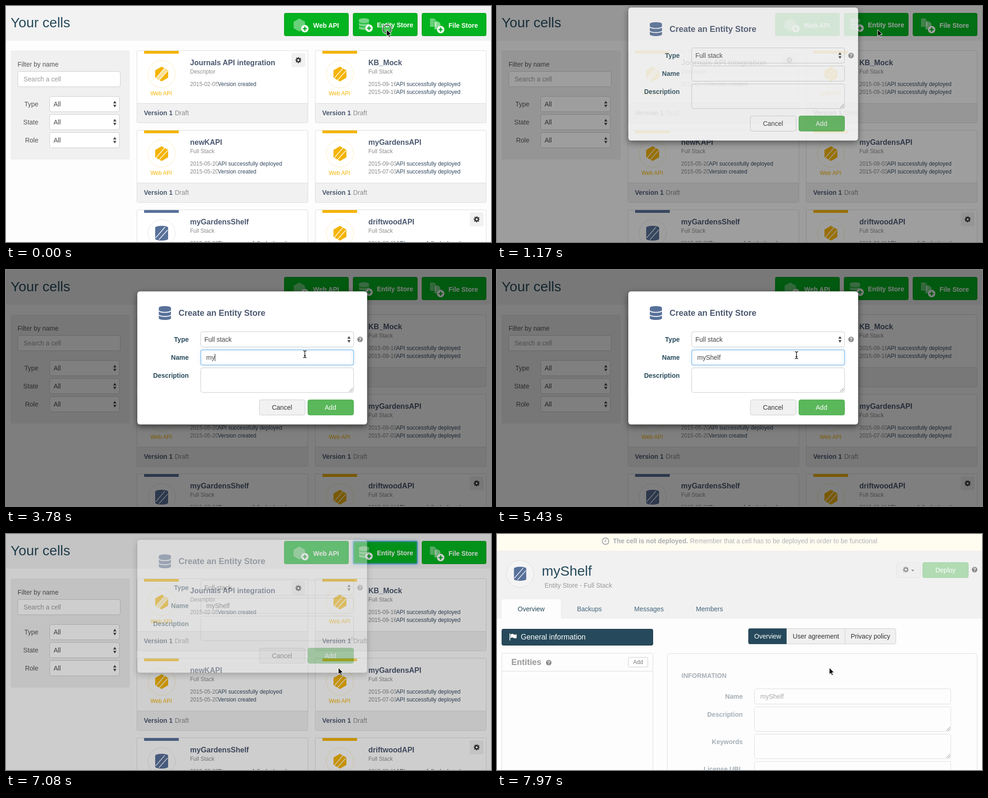
An HTML page that plays this animation: 1050x510 px, repeating every 8 s.

```html
<!DOCTYPE html>
<html lang="en">
<head>
<meta charset="utf-8">
<title>Your cells</title>
<style>
html, body { margin: 0; width: 100%; height: 100%; overflow: hidden; background: #fdfdfd; }
svg { display: block; width: 1050px; height: 510px; font-family: "Liberation Sans", Arial, sans-serif; }
.glow { fill: none; stroke: #66afe9; filter: drop-shadow(0 0 3px rgba(82, 168, 236, .8)); }
#dialog > rect:first-child { filter: drop-shadow(0 5px 7px rgba(0, 0, 0, .5)); }
text { white-space: pre; }
</style>
</head>
<body>
<svg id="stage" viewBox="0 0 1050 510"></svg>
<script>
const NAVY = '#264a5b', SLATE = '#4b5870', GOLD = '#f4b400', BLUE = '#58719a', GREY = '#f1f1f1';
const B = 'font-weight="700"', MID = 'text-anchor="middle"', END = 'text-anchor="end"';
const NAME = 'myShelf';

// Drawing helpers
const text = (x, y, s, fill, size = 14, more = '') =>
  `<text x="${x}" y="${y}" fill="${fill}" font-size="${size}" ${more}>${s}</text>`;
const rect = (x, y, w, h, fill, more = '') =>
  `<rect x="${x}" y="${y}" width="${w}" height="${h}" fill="${fill}" ${more}/>`;
const box = (x, y, w, h, fill = '#fff', stroke = '#ccc', r = 4, more = '') =>
  rect(x + .5, y + .5, w - 1, h - 1, fill, `stroke="${stroke}" rx="${r}" ${more}`);
const path = (d, fill, more = '') => `<path d="${d}" fill="${fill}" ${more}/>`;
const circle = (x, y, r, fill, more = '') => `<circle cx="${x}" cy="${y}" r="${r}" fill="${fill}" ${more}/>`;
const at = (x, y, s, k = 1) => `<g transform="translate(${x} ${y}) scale(${k})">${s}</g>`;

const HEX = 'M0-16L14-8V8L0 16L-14 8V-8Z';
const DRUM = 'M-14-12a14 4 0 0 1 28 0v24a14 4 0 0 1-28 0Z';
const slashes = path('M-13 10L7-13M-6 14L13-7', 'none', 'stroke="#fff" stroke-width="1.4"');
const disks = (fill, gap) => path(DRUM, fill) +
  path('M-14-5.5a14 4 0 0 0 28 0M-14 4a14 4 0 0 0 28 0', 'none', `stroke="${gap}" stroke-width="2"`);
const badge = circle(0, 0, 8, '#fff') + path('M-4.5 0h9M0-4.5v9', 'none', 'stroke="#04ac20" stroke-width="2.6"');
const gear = (x, y, c) => at(x, y,
  circle(0, 0, 3.6, 'none', `stroke="${c}" stroke-width="2.8"`) +
  circle(0, 0, 5.4, 'none', `stroke="${c}" stroke-width="2.4" stroke-dasharray="2.12" stroke-dashoffset="1.06"`));
const help = (x, y, c = '#8a8a8a') => circle(x, y, 6, c) + text(x, y + 3.8, '?', '#fff', 10.5, `${B} ${MID}`);
const arrows = (x, y) => path(`M${x - 3.5} ${y - 1.5}h7l-3.5-5.5ZM${x - 3.5} ${y + 1.5}h7l-3.5 5.5Z`, '#444');
const grip = (x, y) => path(`M${x - 8} ${y}l8-8M${x - 4} ${y}l4-4`, 'none', 'stroke="#777"');

function button(x, label, tx, ty, icon, bx, by) {
  return box(x, 15, 140, 50, '#04b320', '#0a9a20', 3) + icon + at(bx, by, badge) + text(tx, ty, label, '#fff', 14, B);
}

function card(col, row, title, sub, events, kind, hasGear) {
  const store = kind === 'store', tint = store ? BLUE : GOLD;
  let s = box(0, 0, 371, 157, '#fff', '#dcdcdc', 2) + rect(1, 114, 369, 42, GREY) + rect(1, 114, 369, 1, '#dcdcdc') +
    rect(16, 1, 75, 6, tint) + circle(54, 51, 29.5, '#fff', `stroke="${store ? '#e6e6ea' : '#fbecc0'}"`) +
    at(54, 51, path(store ? DRUM : HEX, tint) +
      (kind === 'part' ? path('M-13 9L6-13L13-8L-5 14Z', '#fbdf94') : '') + slashes) +
    text(53, 97, store ? 'Entity Store' : 'Web API', tint, 12, MID) +
    text(115.5, 32, title, SLATE, 16, B) + text(115.5, 50, sub, '#8c8c8c', 12);
  events.forEach(([date, what], i) => {
    const y = 77 + i * 17;
    s += text(115.5, y, date, '#888', 12) + rect(175.5, y - 11, 6, 14, '#fff') + text(175.5, y, what, '#334a60', 12);
  });
  s += text(15.5, 140, 'Version 1', SLATE, 14, B) + text(82.5, 140, 'Draft', '#8c8c8c');
  if (hasGear) s += rect(335, 6, 30, 30, GREY, 'rx="3"') + gear(350, 21, '#333');
  return at(283 + col * 386, 96 + row * 172, s);
}

function cells() {
  const done = 'API successfully deployed', made = 'Version created', full = 'Full Stack';
  const pale = 'fill-opacity=".4"';
  const page = 'h9l5 5v13h-14Z';
  return rect(0, 0, 1050, 510, '#fdfdfd') + rect(0, 0, 1050, 75, '#f2f2f2') + text(10, 46, 'Your cells', NAVY, 30) +
    button(602, 'Web API', 665, 47, at(635, 41, path(HEX, '#fff', pale), .88), 647, 49) +
    button(751, 'Entity Store', 803, 46, at(775, 39, `<g opacity=".45">${disks('#fff', '#04b320')}</g>`, .78), 786, 48) +
    button(900, 'File Store', 958, 47, path('M918 27' + page, '#fff', pale) +
      path('M927 33' + page, '#fff', 'fill-opacity=".5" stroke="#04b320"'), 941, 51) +
    `<g id="back">${box(751, 15, 140, 50, 'none', '#3b8fd6', 3, 'class="glow" stroke-width="2"')}</g>` +
    rect(10, 96, 258, 236, '#f0f0f0', 'rx="4"') + text(25, 131, 'Filter by name', '#555') +
    box(25, 141, 223, 34) + text(38, 163, 'Search a cell', '#999') +
    ['Type', 'State', 'Role'].map((s, i) => at(0, i * 39, text(70, 217, s, '#555', 14, END) +
      box(94, 195, 152, 34) + text(103, 217, 'All', '#444') + arrows(235.5, 212))).join('') +
    card(0, 0, 'Journals API integration', 'Descriptor', [['2015-02-05', made]], 'part', true) +
    card(1, 0, 'KB_Mock', full, [['2015-09-16', done], ['2015-09-16', done]]) +
    card(0, 1, 'newKAPI', full, [['2015-05-20', done], ['2015-05-20', made]]) +
    card(1, 1, 'myGardensAPI', full, [['2015-09-03', done], ['2015-07-03', done]]) +
    card(0, 2, 'myGardensShelf', full, [['2015-07-20', 'Store successfully deployed']], 'store') +
    card(1, 2, 'driftwoodAPI', full, [['2015-09-11', done]], '', true);
}

function dialog() {
  const label = (y, s) => text(395.5, y, s, NAVY, 14, `${B} ${END}`);
  const glow = (id, ...r) => `<g id="${id}">${box(...r, 'none', '#66afe9', 4, 'class="glow"')}</g>`;
  return rect(284, 46, 498, 288, '#fff', 'rx="6" stroke="#000" stroke-opacity=".25"') +
    at(344, 93, disks(BLUE, '#fff'), .94) + text(373.5, 99, 'Create an Entity Store', SLATE, 18, B) +
    label(155, 'Type') + label(194, 'Name') + label(233, 'Description') +
    box(421, 133, 332, 34) + text(429.5, 155, 'Full stack', '#444') + arrows(742.5, 150) + help(766.5, 150) +
    box(421, 172, 332, 34) + box(421, 211, 332, 54) + grip(751, 263) +
    glow('typeGlow', 421, 133, 332, 34) + glow('nameGlow', 421, 172, 332, 34) +
    text(433.5, 194, '', '#444', 14, 'id="typed"') + rect(0, 181, 1, 16, '#222', 'id="caret"') +
    box(548, 280, 100, 34, '#fff', '#ccc', 4, 'id="cancel"') + text(597.5, 302, 'Cancel', '#333', 14, MID) +
    box(653, 280, 100, 34, '#5ab75a', '#4cae4c', 4, 'id="add"') + text(702.5, 302, 'Add', '#fff', 14, MID) +
    glow('addGlow', 653, 280, 100, 34);
}

function detail() {
  const tabs = [[74, 'Overview'], [200, 'Backups'], [329, 'Messages'], [460, 'Members']];
  const field = (y, h, ly, s) => text(532, ly, s, '#a5b0b8', 14, `${B} ${END}`) +
    box(557, y, 426, h, '#fdfdfd', '#ddd') + (h > 40 ? grip(981, y + h - 2) : '');
  const solid = at(50, 86, circle(0, 0, 29.5, '#f4f4f4', 'stroke="#ddd"') + at(0, 0, path(DRUM, BLUE) + slashes, .95)) +
    text(97, 90, NAME, NAVY, 30) + text(103, 116, 'Entity Store - Full Stack', '#999') +
    path('M10 183v-38q0-4 4-4h120q4 0 4 4v38Z', '#fdfdfd') +
    tabs.map(([x, s], i) => text(x, 167, s, i ? '#41657a' : NAVY, 14, MID)).join('') +
    box(10, 205, 328, 36, NAVY, '#1d3b49', 3) +
    path('M27 215h1.6v15H27ZM29.5 217q4-2.5 7 0q3 1.4 6-.6v8q-3 2-6 .6q-3-2.4-7 0Z', '#fff') +
    text(51.5, 228, 'General information', '#fff', 16) +
    box(10, 257, 328, 300, '#fdfdfd', '#ddd') + rect(10, 296, 327, 1, '#ddd') +
    text(31, 283, 'Entities', '#999', 18, B) + help(112, 278) +
    box(284, 266, 43, 22, '#fff', '#ccc', 3) + text(305.5, 281, 'Add', '#777', 12, MID) +
    box(544, 204, 320, 34, '#f0f0f0', '#ccc') + path('M627 204h-79q-4 0-4 4v26q0 4 4 4h79Z', NAVY) +
    rect(753, 205, 1, 32, '#ccc') + text(586, 226, 'Overview', '#fff', 14, MID) +
    text(690.5, 226, 'User agreement', '#333', 14, MID) + text(808.5, 226, 'Privacy policy', '#333', 14, MID) +
    box(368, 258, 672, 300, '#fdfdfd', '#ddd');
  const soft = circle(235, 15.5, 7, 'none', 'stroke="#a8acb0" stroke-width="2"') +
    path('M235.5 11.5v4.5h-3.5', 'none', 'stroke="#a8acb0" stroke-width="1.5"') +
    text(251, 20, 'The cell is not deployed.', '#a9acb2', 14, B) +
    text(418, 20, 'Remember that a cell has to be deployed in order to be functional', '#b0b3b9') +
    box(865, 61, 52, 34, '#efefef', '#e6e6e6') + gear(885, 77, '#999') + path('M896.5 77h7l-3.5 4Z', '#999') +
    box(921, 61, 100, 34, '#b1dbb2', '#abd6ac') + text(971, 83, 'Deploy', '#fff', 14, MID) + help(1034, 77) +
    text(399.5, 311, 'INFORMATION', '#a9b0b6', 14, B) +
    field(334, 34, 356, 'Name') + text(570, 356, NAME, '#aaa') +
    field(373, 54, 395, 'Description') + field(432, 54, 454, 'Keywords') + field(491, 34, 513, 'License URL');
  return rect(0, 0, 1050, 510, '#fdfdfd') + rect(0, 0, 1050, 36, '#fffcf0') + rect(0, 36, 1050, 147, '#f1f1f1') +
    `<g id="solid">${solid}</g><g id="soft">${soft}</g>`;
}

const pointers = `<defs>
  ${path('M0 0V14.5L3.4 11.4L5.6 16.5L8 15.5L5.8 10.4H10.3Z', '#000', 'id="arrow" stroke="#fff"')}
  <g id="beam">${['#fff', '#111'].map((c, i) => path('M-3.5-7.5Q0-7.5 0-5.5Q0-7.5 3.5-7.5M0-6V6M-3.5 7.5Q0 7.5 0 5.5Q0 7.5 3.5 7.5M-2 3h4',
    'none', `stroke="${c}" stroke-width="${i ? 1.3 : 2.6}"`)).join('')}</g>
  ${path('M-1.5 1q1.5-2 3 0v5l5.5 1.4q2 .6 1.8 2.6l-1 4.5v2.5h-8l-5-6.5q0-2 2-1.2l1.7 1.2Z', '#fff', 'id="hand" stroke="#000" stroke-width="1.2"')}
</defs>`;

const ring = circle(1, -1, 9.5, '#fff', 'fill-opacity=".25" stroke="#fff" stroke-width="2.6"') +
  circle(1, -1, 9, 'none', 'stroke="#111" stroke-width="1.3"');

const $ = id => document.getElementById(id);
$('stage').innerHTML = pointers + `<g id="cells">${cells()}</g>` + rect(0, 0, 1050, 510, '#000', 'id="shade"') +
  `<g id="dialog">${dialog()}</g><g id="detail">${detail()}</g>` +
  `<g id="cursor"><g id="ring">${ring}</g><use id="pointer" href="#arrow"/></g>`;

const ticks = [0, 140, 590, 735, 880, 1025, 1170, 1380, 1830, 1980, 2130, 2270, 2420, 2570, 2710, 2890,
  3340, 3780, 4230, 4380, 4680, 4830, 4980];
for (let t = 5430; t <= 7380; t += 150) ticks.push(t);
ticks.push(7830, 7970);
const keys = [3340, 3780, 4230, 4380, 4680, 4830, 4980];

const ramp = (t, a, b) => Math.min(1, Math.max(0, (t - a) / (b - a)));
const smooth = u => u * u * (3 - 2 * u);
const mix = (a, b, u) => a + (b - a) * u;
const show = (id, on) => $(id).setAttribute('visibility', on ? 'inherit' : 'hidden');
const set = (id, name, value) => $(id).setAttribute(name, value);

function draw(t) {
  const closing = t >= 6780;
  const fade = 1 - ramp(t, 6790, 7260);
  set('shade', 'opacity', .5 * ramp(t, 500, 1380) * fade);
  set('dialog', 'opacity', ramp(t, 880, 1230) * fade);
  const lift = 1 - ramp(t, 1025, 1380) + ramp(t, 6850, 7330);
  set('dialog', 'transform', `translate(0 ${Math.round(-72 * lift)})`);

  show('typeGlow', t >= 1380 && t < 2890);
  show('nameGlow', t >= 2890 && t < 6630);
  show('addGlow', t >= 6480 && !closing);
  show('back', closing);
  set('cancel', 'fill', t < 2570 ? '#fff' : '#f1f1f1');
  set('add', 'fill', closing || t < 6180 ? '#5ab75a' : t < 6480 ? '#449d44' : '#35803a');

  $('typed').textContent = NAME.slice(0, keys.filter(k => k <= t).length);
  set('caret', 'x', Math.round(433.5 + $('typed').getComputedTextLength()));
  show('caret', t >= 2890 && t < 5430);

  show('detail', t >= 7380);
  show('solid', t >= 7830);
  show('soft', t >= 7830);
  set('soft', 'opacity', t < 7970 ? .5 : 1);

  const toName = smooth(ramp(t, 1750, 2465)), toAdd = smooth(ramp(t, 5350, 6330));
  const x = mix(mix(824, 647, toName), 719.5, toAdd), y = mix(mix(51, 182, toName), 289, toAdd);
  const inField = toName > 0 && (y > 172 && y < 206 || y > 211 && y < 265);
  set('cursor', 'transform', `translate(${x.toFixed(1)} ${y.toFixed(1)})`);
  set('pointer', 'href', closing ? '#arrow' : inField ? '#beam' : y > 280 ? '#hand' : '#arrow');
  show('ring', t < 140 || t >= 6480 && t < 6630);
}

const start = performance.now();
function frame() {
  const t = (performance.now() - start) % 8000;
  draw(ticks.filter(k => k <= t).pop());
  requestAnimationFrame(frame);
}
frame();
</script>
</body>
</html>
```
